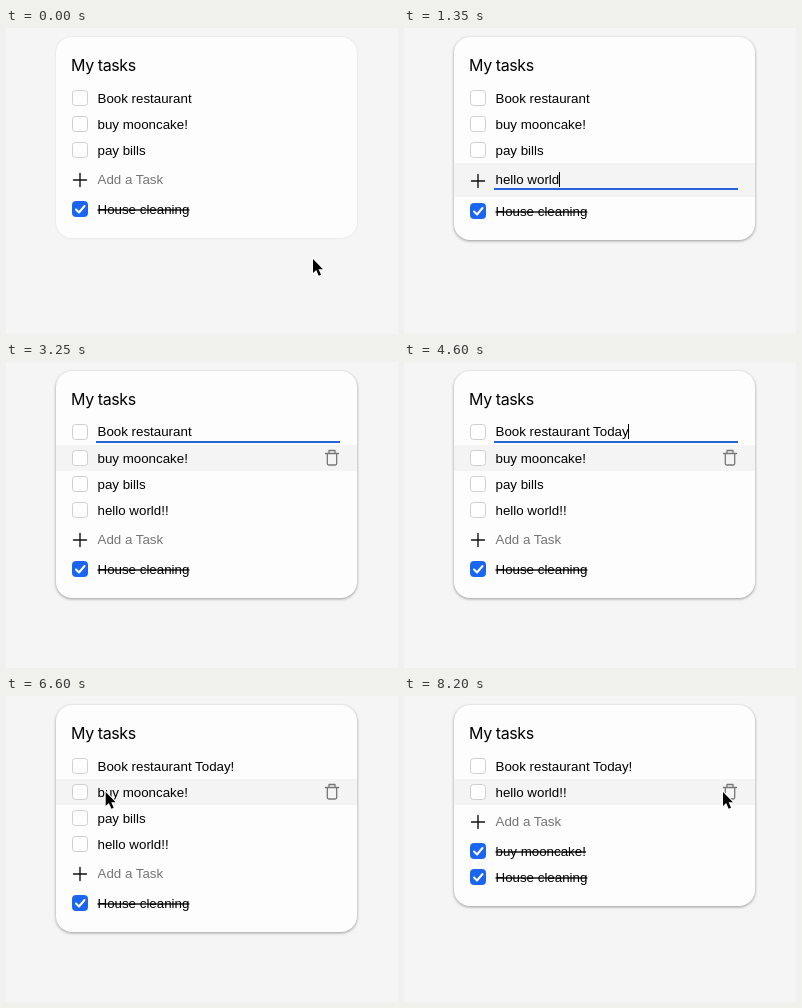
An HTML page for the animation above (8250 ms loop, 392 by 306 pixels).

```html
<!DOCTYPE html>
<html lang="en">
<head>
<meta charset="utf-8">
<title>My tasks</title>
<style>
  html, body { margin: 0; height: 100%; overflow: hidden; background: #f5f5f5; }
  svg { display: block; width: 100%; height: 100%; }
  text { font: 13.333px "Liberation Sans", Arial, sans-serif; white-space: pre; }
  .title { font: 16px Inter, sans-serif; letter-spacing: -.4px; }
  .hint { fill: #757575; }
  .done { text-decoration: line-through; }
  .card { fill: #fdfdfd; filter: drop-shadow(0 0 1px rgba(0,0,0,.1)); }
  .card.on { filter: drop-shadow(0 1px 1.5px rgba(0,0,0,.38)); }
  .line { fill: none; stroke-linecap: round; stroke-linejoin: round; }
</style>
</head>
<body>
<svg id="stage" viewBox="0 0 392 306"></svg>
<script>
const LOOP = 8250, STEP = 50, ROW = 26, TOP = 70, TEXT_X = 91.5, BLUE = '#2563d9';
const stage = document.getElementById('stage');
const pen = document.createElement('canvas').getContext('2d');
pen.font = '13.333px "Liberation Sans", Arial, sans-serif';

// time, x, y of the pointer
const path = [
  [0, 307, 231], [650, 175, 149], [2150, 175, 149], [2400, 141, 119],
  [2700, 200, 69], [3000, 200, 69], [3200, 296, 96], [5850, 296, 96],
  [6000, 233, 96], [6300, 233, 96], [6700, 75, 96], [7050, 75, 96],
  [7250, 197, 84], [7550, 319, 96], [LOOP, 319, 96]
];
const addKeys = [...Array(11)].map((_, i) => 850 + Math.ceil((i + 1) * 10 / 11) * STEP).concat(1600, 1700);
const editKeys = [3300, 4250, 4400, 4450, 4550, 4600, 4900];

function pointer(t) {
  const i = Math.max(1, path.findIndex(p => p[0] >= t));
  const [t0, x0, y0] = path[i - 1], [t1, x1, y1] = path[i];
  const k = (t - t0) / (t1 - t0), e = k * k * (3 - 2 * k);
  return [x0 + (x1 - x0) * e, y0 + (y1 - y0) * e];
}

const typed = (s, keys, t) => s.slice(0, keys.filter(k => k <= t).length);
const rect = (x, y, w, h, fill) => `<rect x="${x}" y="${y}" width="${w}" height="${h}" fill="${fill}"/>`;
const text = (s, y, cls = '', x = TEXT_X) => `<text x="${x}" y="${y}" class="${cls}">${s}</text>`;
const line = (d, color, width) => `<path class="line" d="${d}" stroke="${color}" stroke-width="${width}"/>`;
const band = (y, h) => rect(50, y, 301, h, '#f4f4f4');

// blinking caret, restarted by every key
function caret(s, y, t, marks) {
  const last = Math.max(...marks.filter(m => m <= t));
  const x = Math.floor(TEXT_X + pen.measureText(s).width);
  return (t - last) % 500 < 250 ? rect(x, y - 12, 1, 15, '#000') : '';
}

function checkbox(y, done, hot) {
  const fill = done ? '#1b66f0' : '#fff', edge = done ? fill : hot ? '#8fb2f0' : '#cfcfcf';
  return `<rect x="66.5" y="${y - 7.5}" width="15" height="15" rx="3" fill="${fill}" stroke="${edge}"/>` +
    (done ? line(`M70 ${y + .5}l3 3 5.5-6.5`, '#fff', 2) : '');
}

const trash = y => line(
  `M319.5 ${y - 4.5}h13M323 ${y - 5}v-2.5h6v2.5M321.3 ${y - 4}v9.5q0 1.5 1.5 1.5h6.4q1.5 0 1.5-1.5v-9.5`,
  '#777', 1.3);

const arrow = (x, y) => `<path transform="translate(${x} ${y})" stroke="#fff" paint-order="stroke"
  stroke-width="2" d="M0 0v14l3.2-3 2.5 5.7 2.3-1-2.4-5.5h4.4z"/>`;

function draw(t) {
  const [mx, my] = pointer(t), [px, py] = pointer(Math.max(0, t - 200));
  const adding = t >= 750 && t < 2800, editing = t >= 2800 && t < 6150;
  const entered = t >= 1850, checked = t >= 6850;
  const first = 'Book restaurant' + typed(' Today!', editKeys, t);

  const open = [first];
  if (!checked) open.push('buy mooncake!');
  if (t < 7900) open.push('pay bills');
  if (entered) open.push('hello world!!');
  const done = checked ? ['buy mooncake!', 'House cleaning'] : ['House cleaning'];

  const addY = TOP + ROW * open.length, grow = adding ? 2 : 0;
  const doneY = addY + 33 + grow;
  const bottom = doneY + ROW * (done.length - 1) + 29;
  const over = (y, h) => my >= y && my < y + h;

  const row = (s, y, isDone, edit) => {
    const hover = over(y - 13, ROW);
    const hot = [[mx, my], [px, py]].some(([x, v]) => x < 84 && Math.abs(v - y) < 9);
    return (hover ? band(y - 13, ROW) + (edit ? '' : trash(y)) : '') +
      checkbox(y, isDone, hot) +
      text(s, y + (edit ? 4 : 5), isDone ? 'done' : '') +
      (edit ? rect(90, y + 9, 244, 2, BLUE) + caret(s, y + 4, t, [2800, ...editKeys]) : '');
  };

  let out = `<rect class="card ${my < bottom ? 'on' : ''}" x="50" y="9" width="301" height="${bottom - 9}" rx="16"/>`;
  out += text('My tasks', 43, 'title', 65);
  open.forEach((s, i) => out += row(s, TOP + ROW * i, false, editing && i === 0));

  // input for a new task
  const draft = entered ? '' : typed('hello world!!', addKeys, t);
  if (over(addY - 13, 32 + grow)) out += band(addY - 13, 32 + grow);
  const plusY = addY + 4 + grow / 2;
  out += line(`M67.5 ${plusY}h13M74 ${plusY - 6.5}v13`, '#111', 1.4);
  out += text(draft || 'Add a Task', addY + 8, draft ? '' : 'hint');
  if (adding) out += rect(90, addY + 12, 244, 2, BLUE) + caret(draft, addY + 8, t, [750, ...addKeys, 1900]);

  done.forEach((s, i) => out += row(s, doneY + ROW * i, true));
  if (t < 900 || t >= 2200 && t < 3250 || t >= 5650) out += arrow(mx, my);
  stage.innerHTML = out;
}

const start = performance.now();
function tick() {
  const t = (performance.now() - start) % LOOP;
  draw(Math.floor(t / STEP) * STEP);
  requestAnimationFrame(tick);
}
tick();
</script>
</body>
</html>
```
